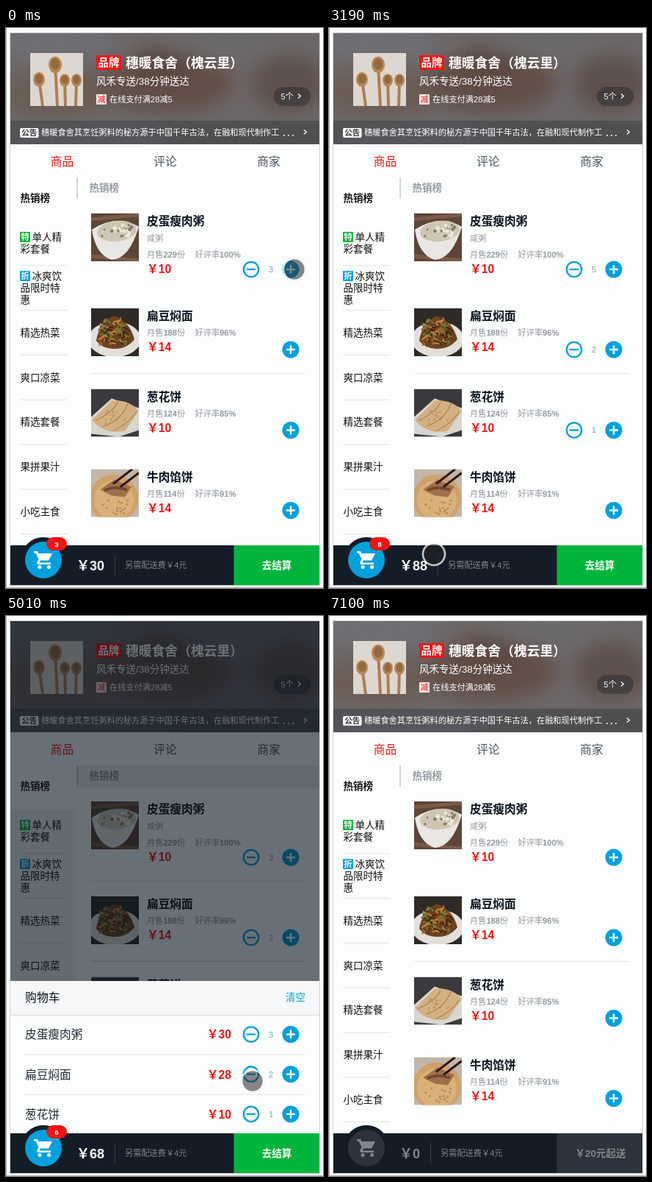
Recreate the animation shown at these times as an HTML page. Size 432 by 761 pixels, loop 7360 ms.

```html
<!DOCTYPE html>
<html lang="zh-CN">
<head>
<meta charset="utf-8">
<title>点餐</title>
<style>
html, body { margin: 0; width: 100%; height: 100%; overflow: hidden; background: #fff; }
svg { display: block; width: 432px; height: 761px; }
text { font-family: "Liberation Sans", "Noto Sans CJK SC", "Noto Sans CJK", sans-serif; white-space: pre; }
</style>
</head>
<body>
<svg viewBox="0 0 432 761">
  <defs>
    <clipPath id="head"><rect x="6" y="7" width="421" height="151"/></clipPath>
    <clipPath id="thumb"><rect width="65" height="65"/></clipPath>
    <filter id="blur" x="-20%" y="-20%" width="140%" height="140%"><feGaussianBlur stdDeviation="12"/></filter>
  </defs>
  <g id="page"></g>
  <g id="live"></g>
</svg>
<script>
const LOOP = 7360, CLEAR = 5880, BLUE = '#00a0dc', RED = '#f01414', INK = '#07111b', GRAY = '#93999f', BAR = '#141d27';
const FOODS = [
  { name: '皮蛋瘦肉粥', price: 10, y: 252, sold: 229, rate: 100, note: '咸粥', start: 3 },
  { name: '扁豆焖面', price: 14, y: 381, sold: 188, rate: 96, start: 0 },
  { name: '葱花饼', price: 10, y: 490.5, sold: 124, rate: 85, start: 0 },
  { name: '牛肉馅饼', price: 14, y: 599.5, sold: 114, rate: 91, start: 0 }
];
// time, food index, change
const CLICKS = [[120, 0, 1], [830, 1, 1], [1230, 1, 1], [1850, 2, 1], [2450, 0, 1], [4160, 0, -1], [4600, 0, -1]];
// time, x, y
const POINTER = [
  [0, 393, 328], [300, 393, 328], [650, 392, 437], [1400, 392, 437], [1814, 395, 552], [2080, 395, 552],
  [2230, 392, 450], [2380, 389, 330], [2650, 388, 330], [2920, 180, 745], [3190, 143, 715], [3440, 153, 711],
  [3600, 153, 711], [4000, 334, 570], [4700, 334, 570], [5010, 336, 632], [5140, 340, 632], [5520, 395, 524],
  [6050, 395, 524], [6860, 364, 739], [6980, 306, 756], [7100, 250, 790], [LOOP, 250, 790]
];
// The picture advances in runs of even steps: first, last, count
const STEPS = [
  [0, 0, 1], [150, 1110, 8], [1230, 1960, 6], [2080, 2230, 2], [2380, 3190, 7], [3440, 3590, 2], [3730, 4440, 6],
  [4590, 5010, 4], [5140, 5520, 4], [5920, 6050, 2], [6200, 6860, 6], [6980, 7100, 2]
].flatMap(([a, b, n]) => Array.from({ length: n }, (_, i) => a + (b - a) * i / Math.max(1, n - 1)));

const clamp = v => Math.max(0, Math.min(1, v));
const rect = (x, y, w, h, fill, extra = '') => `<rect x="${x}" y="${y}" width="${w}" height="${h}" fill="${fill}" ${extra}/>`;
const circle = (x, y, r, fill, extra = '') => `<circle cx="${x}" cy="${y}" r="${r}" fill="${fill}" ${extra}/>`;
const oval = (x, y, rx, ry, fill, extra = '') => `<ellipse cx="${x}" cy="${y}" rx="${rx}" ry="${ry}" fill="${fill}" ${extra}/>`;
const line = (d, color, width, extra = '') => `<path d="${d}" fill="none" stroke="${color}" stroke-width="${width}" ${extra}/>`;
// y is the vertical middle of the line of text
const text = (s, x, y, size, fill, weight = 400, anchor = 'start') =>
  `<text x="${x}" y="${y + size * .37}" font-size="${size}" fill="${fill}" font-weight="${weight}" text-anchor="${anchor}">${s}</text>`;
const bold = s => `<tspan font-weight="700">${s}</tspan>`;
const at = (x, y, body, extra = '', angle = 0) => `<g transform="translate(${x} ${y}) rotate(${angle})" ${extra}>${body}</g>`;
const chevron = (x, y) => line(`M${x - 2} ${y - 3}l3.5 3-3.5 3`, '#fff', 1.3);
const buttonY = f => f.y + (f.note ? 76 : 56);

let seed = 7;
const random = () => (seed = seed * 16807 % 2147483647) / 2147483647;
const scatter = (n, make) => Array.from({ length: n }, make).join('');

const PICTURES = [
  () => rect(0, 0, 65, 65, '#5d4537') + line('M0 8L65 2M0 58L65 64', '#7a5a48', 5) +
    '<path d="M1 22Q6 56 28 63Q52 62 65 18Q34 0 1 22Z" fill="#e9e7e4"/>' + oval(35, 24, 27, 14, '#cdc6b3', 'transform="rotate(-6 35 24)"') +
    scatter(26, () => circle(15 + random() * 40, 15 + random() * 17, 1 + random() * 2, random() < .35 ? '#837b66' : '#ece7d8')),
  () => rect(0, 0, 65, 65, '#2e2a27') + oval(32, 42, 36, 24, '#e2dfda') + '<path d="M7 44Q10 22 30 10Q52 16 59 42Q48 56 30 55Q14 54 7 44Z" fill="#6e4220"/>' +
    scatter(56, () => line(`M${10 + random() * 32} ${18 + random() * 30}q${random() * 14} ${random() * 16 - 12} ${random() * 14} ${random() * 10 - 4}`,
      ['#a5652c', '#c98a45', '#452510', '#63823a'][random() * 4 | 0], 1.8)),
  () => rect(0, 0, 65, 65, '#3a3a3e') + '<path d="M0 38L28 13L65 26V56L38 65L0 61Z" fill="#d8d6d0"/>' +
    '<path d="M1 42L28 16Q52 14 65 30L46 57Q18 63 1 42Z" fill="#d3b083"/>' + line('M6 43Q30 32 36 18M16 51Q42 42 50 20M30 57Q50 48 62 31', '#b08450', 1.3) +
    scatter(18, () => circle(17 + random() * 32, 28 + random() * 22, 1, '#b88a50')),
  () => rect(0, 0, 65, 65, '#c2b6a8') + circle(31, 40, 33, '#cfa26a') + circle(31, 42, 27, '#d8b07a') +
    '<path d="M12 28L32 14L55 24L46 38L28 36Z" fill="#a0704c"/>' + line('M18 29Q32 22 49 28', '#75492f', 4) +
    line('M30 20L56 0M40 24L65 5', '#2b1814', 3) + scatter(16, () => circle(12 + random() * 38, 42 + random() * 20, 1.5, '#bd8a50'))
];

function shopPicture() {
  const spoons = [[12, 36, 8], [34, 16, 9], [47, 37, 7], [63, 37, 7]];
  return rect(0, 0, 72, 72, '#ddd7d1') + spoons.map(([x, y, r], i) =>
    line(`M${x} ${y}L${x + 5 - i * 2} 72`, '#b07e4e', 4) + oval(x, y, r, r * 1.25, '#b98555') + oval(x, y - 1, r * .65, r * .85, '#93693f')).join('');
}

function header() {
  const blobs = [
    [60, 20, 90, 20, '#706f74'], [70, 90, 80, 34, '#6a5d55'], [220, 75, 90, 40, '#625047'], [215, 50, 40, 26, '#5b493f'],
    [300, 22, 90, 14, '#6c6a6d'], [385, 75, 50, 40, '#5d514b'], [110, 150, 110, 16, '#727176'], [330, 150, 110, 14, '#66605f']
  ];
  return `<g clip-path="url(#head)">${rect(6, 7, 421, 151, '#6c6768')}<g filter="url(#blur)">${blobs.map(b => oval(...b)).join('')}</g>` +
    rect(6, 126, 421, 32, INK, 'opacity=".25"') + '</g>' + at(33, 34, shopPicture()) +
    rect(123, 37, 34, 20, RED, 'rx="2"') + text('品牌', 140, 47, 14.5, '#fff', 700, 'middle') +
    text('穗暖食舍（槐云里）', 163, 47, 17.8, '#fff', 700) + text('风禾专送/38分钟送达', 123, 72, 13.5, '#fff') +
    rect(123, 90, 14, 14, '#f8e9e7', 'rx="1"') + text('减', 130, 97, 11, RED, 400, 'middle') +
    text('在线支付满28减5', 141, 97, 11.2, '#fff', 500) +
    rect(365, 80, 50, 26, INK, 'rx="13" opacity=".3"') + text('5个', 374.5, 93, 11.2, '#fff', 500) + chevron(400, 92.5) +
    rect(19, 136, 25.5, 13, '#fff', 'rx="2"') + text('公告', 31.8, 142.5, 10.5, '#333', 700, 'middle') +
    text('穗暖食舍其烹饪粥料的秘方源于中国千年古法，在融和现代制作工', 48, 142, 11.2, '#fff') +
    [379, 385, 391].map(x => circle(x, 146, 1, '#fff')).join('') + chevron(408, 141.5);
}

function menu() {
  const rows = [['热销榜'], ['　单人精', '彩套餐'], ['　冰爽饮', '品限时特', '惠'], ['精选热菜'], ['爽口凉菜'], ['精选套餐'], ['果拼果汁'], ['小吃主食']];
  return rows.map((lines, i) => {
    const mid = 231.5 + i * 60.8, top = mid - (lines.length - 1) * 7.9;
    return lines.map((s, j) => text(s.replace('　', ''), s[0] === '　' ? 35.5 : 19.5, top + j * 15.8, 13.5, '#111', i ? 400 : 700)).join('') +
      (i ? rect(19, mid + 30, 64, 1, '#dfe2e4') : '');
  }).join('') + [['特', 277, '#00b43c'], ['折', 330, BLUE]].map(([s, y, c]) =>
    rect(19, y, 14, 14, c, 'rx="1"') + text(s, 26, y + 7, 11.5, '#fff', 700, 'middle')).join('');
}

function foodRow(f, i) {
  const info = f.y + (f.note ? 56 : 33);
  return at(116, f.y, PICTURES[i](), 'clip-path="url(#thumb)"') + text(f.name, 192, f.y + 10.5, 15.7, INK, 700) +
    (f.note ? text(f.note, 192, f.y + 34, 11.2, GRAY, 300) : '') +
    text(`月售${bold(f.sold)}份`, 192, info, 11.2, GRAY, 300) + text(`好评率${bold(f.rate + '%')}`, 257.5, info, 11.2, GRAY, 300) +
    text('￥' + f.price, 192, info + 19.5, 15.7, RED, 700);
}

const plus = (x, y) => circle(x, y, 11.5, BLUE) + line(`M${x - 6} ${y}h12M${x} ${y - 6}v12`, '#fff', 2.4);
const minus = (x, y, angle = 0, opacity = 1) => at(x, y,
  circle(0, 0, 10.2, 'none', `stroke="${BLUE}" stroke-width="2.3"`) + line('M-6 0h12', BLUE, 2.3), `opacity="${opacity}"`, angle);
const amount = (n, y) => text(n, 361, y, 11.2, GRAY, 400, 'middle');

function counter(f, i, n, t) {
  const y = buttonY(f), first = CLICKS.find(c => c[1] === i);
  let out = '';
  if (n) {
    const p = f.start ? 1 : clamp((t - first[0]) / 400);
    out = minus(334 + 27 * (1 - p), y, 180 * (1 - p), p) + amount(n, y - .5);
  } else if (first && t >= CLEAR) {
    const p = clamp((t - CLEAR) / 400);
    if (p < 1) out = minus(334 + 27 * Math.min(1, 2.1 * p), y, 180 * p, 1 - p);
  }
  return out + plus(388, y);
}

const cubic = (s, a, b) => 3 * (1 - s) ** 2 * s * a + 3 * (1 - s) * s * s * b + s ** 3;
function toss(p) {
  let lo = 0, hi = 1;
  for (let i = 0; i < 20; i++) {
    const mid = (lo + hi) / 2;
    if (cubic(mid, .49, .75) < p) lo = mid; else hi = mid;
  }
  return cubic(lo, -.29, .41);
}

function balls(t) {
  return CLICKS.filter(c => c[2] > 0 && t >= c[0] + 40 && t < c[0] + 400).map(([start, i]) => {
    const p = (t - start) / 400, y = buttonY(FOODS[i]) - 31;
    return circle(388 - 337 * p, y + (723 - y) * toss(p), 9, BLUE);
  }).join('');
}

function shade(t) {
  const opacity = t < 3380 ? 0 : 1 - clamp((t - CLEAR) / 130);
  if (!opacity) return '';
  return `<g opacity="${opacity}">` + rect(6, 263, 90, 441, INK, 'opacity=".05"') + rect(97, 203, 330, 31, INK, 'opacity=".06"') +
    [360, 469, 578].map(y => rect(116, y - 1, 292, 2, INK, 'opacity=".07"')).join('') + rect(6, 7, 421, 750, INK, 'opacity=".6"') + '</g>';
}

function sheet(t, counts) {
  if (t < 3380 || t > CLEAR + 330) return '';
  const open = t < CLEAR;
  const h = open ? 208 * (1 - (1 - clamp((t - 3370) / 400)) ** 1.3) : 46 * (1 - (t - CLEAR) / 330);
  const rows = FOODS.filter((f, i) => counts[i]).map((f, i) => {
    const y = 72.5 + i * 54.2, n = counts[FOODS.indexOf(f)];
    return text(f.name, 26, y, 15.7, '#222b34', 300) + text('￥' + f.price * n, 307, y, 15.7, RED, 700, 'end') +
      minus(334, y) + amount(n, y) + plus(388, y) + (i < 2 ? rect(26, y + 27, 382, 1, '#e4e7e9') : '');
  }).join('');
  return at(0, 704 - h, rect(6, 0, 421, 208, '#fcfdfd') + (open ? rect(6, 0, 421, 46, '#f5f7f8') + rect(6, 46, 421, 1, '#d9dde1') : '') +
    text('购物车', 26, 22.5, 15.9, INK, 500) + text('清空', 381, 22.5, 13.5, BLUE) + rows);
}

function cartBar(counts) {
  const n = counts.reduce((a, b) => a + b), sum = FOODS.reduce((s, f, i) => s + f.price * counts[i], 0);
  const dim = '#7f868c', x = n ? 148 : 138;
  return rect(6, 703, 421, 54, BAR) + circle(51, 723, 31, BAR) + circle(51, 723, 25, n ? BLUE : '#2b343c') +
    at(38, 711, '<path d="M0 0h5l1.2 3H25l-5 9.5H9l-1.5 3H23v2.5H6q-3-1-1.3-4L6.5 11 2.5 2.5H0z"/>' + '<circle cx="8" cy="21.5" r="2.5"/><circle cx="20.5" cy="21.5" r="2.5"/>',
      `fill="${n ? '#fff' : dim}"`) +
    (n ? rect(55, 692, 28, 18, RED, 'rx="9"') + text(n, 69, 701, 9.8, '#fff', 700, 'middle') : '') +
    text('￥' + sum, 96, 730, 18, n ? '#fff' : dim, 700) + rect(x, 716, 1, 28, '#353e46') +
    text('另需配送费￥4元', x + 14, 730, 11.2, dim) +
    rect(310.5, 703, 116.5, 54, n ? '#00b43c' : '#2b343c') +
    text(n ? '去结算' : '￥20元起送', n ? 369 : 370, 730, 13.5, n ? '#fff' : dim, 700, 'middle');
}

function pointer(t) {
  const k = POINTER.findIndex(p => p[0] > t), [t0, x0, y0] = POINTER[k - 1], [t1, x1, y1] = POINTER[k];
  const p = (t - t0) / (t1 - t0), x = x0 + (x1 - x0) * p, y = y0 + (y1 - y0) * p;
  return circle(x, y, 14, '#222', 'opacity=".55"') + circle(x, y, 15, 'none', 'stroke="#fff" stroke-width="2.6" opacity=".75"') +
    circle(x, y, 16, 'none', 'stroke="#999" stroke-dasharray="1 4" opacity=".7"');
}

function countsAt(t) {
  return FOODS.map((f, i) => t >= CLEAR ? 0 :
    CLICKS.reduce((n, [start, food, change]) => n + (food === i && t >= start ? change : 0), f.start));
}

const page = document.getElementById('page'), live = document.getElementById('live');
page.innerHTML = rect(0, 0, 1, 761, '#b5b5b5') + rect(0, 760, 432, 1, '#b5b5b5') +
  rect(5.5, 6.5, 422, 751, '#fcfdfd', 'stroke="#cfd2d4"') + header() +
  text('商品', 76.5, 181, 15.7, RED, 300, 'middle') + text('评论', 217, 181, 15.7, '#4d555d', 300, 'middle') + text('商家', 358, 181, 15.7, '#4d555d', 300, 'middle') +
  menu() + rect(96, 203, 2, 29, '#d3d7da') + text('热销榜', 113.5, 217, 13.5, GRAY, 700) +
  FOODS.map(foodRow).join('') + rect(116, 469, 292, 1, '#e4e7e9');

const begin = performance.now();
let shown = -1;
function frame() {
  const clock = (performance.now() - begin) % LOOP, t = STEPS.filter(s => s <= clock + .01).pop();
  if (t !== shown) {
    shown = t;
    const counts = countsAt(t);
    live.innerHTML = FOODS.map((f, i) => counter(f, i, counts[i], t)).join('') + shade(t) + sheet(t, counts) +
      cartBar(counts) + balls(t) + pointer(t);
  }
  requestAnimationFrame(frame);
}
frame();
</script>
</body>
</html>
```
